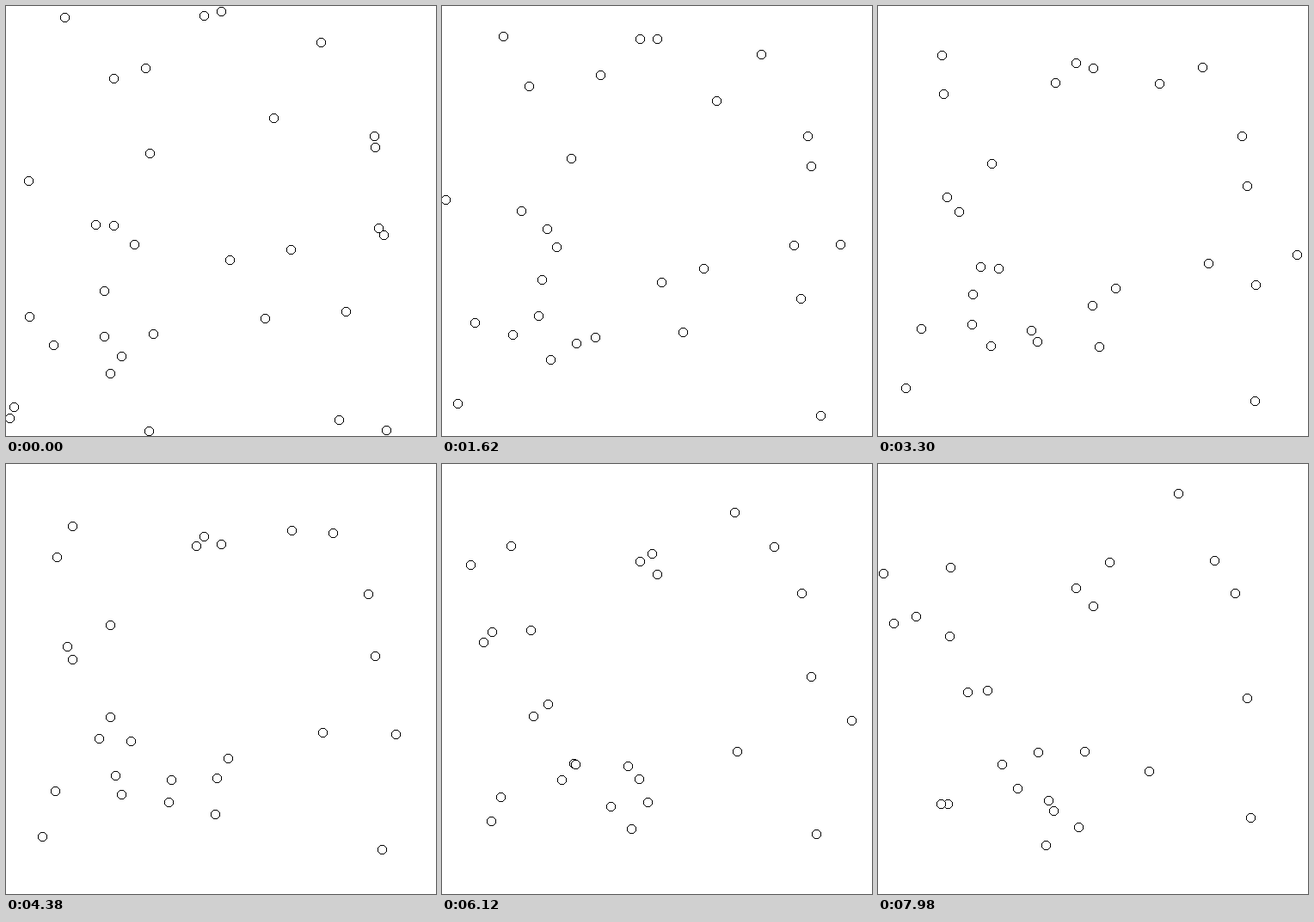
Write an HTML page with a canvas that moves like this. It is 500 px wide and 500 px high and loops after 8000 ms.

```html
<!DOCTYPE html>
<html lang="en">
<head>
<meta charset="utf-8">
<title>Drifting circles</title>
<style>
  html, body { margin: 0; width: 100%; height: 100%; overflow: hidden; background: #fff; }
  canvas { display: block; width: 500px; height: 500px; }
</style>
</head>
<body>
<canvas id="stage" width="500" height="500"></canvas>
<script>
const SIZE = 500, RADIUS = 5, LOOP = 8000, STEP = 60;
const LAST = Math.floor(LOOP / STEP);
const ctx = document.getElementById('stage').getContext('2d');

// Each circle drifts evenly between two key points, back to front:
// x and y at the first step, x and y at the last (may lie off stage).
const paths = [
  [67.8, 13.1, 83.9, 120.4],
  [230, 11, 230, 144],
  [250, 6, 250, 164.9],
  [366.1, 41.8, 391.4, 111.9],
  [162.2, 71.7, 269, 113.6],
  [124.8, 84.2, 5.6, 126.8],
  [311, 129.8, 349.2, 33.8],
  [428, 151, 415, 150.1],
  [429, 163.9, 429, 271.8],
  [167.2, 170.7, 83.1, 200],
  [26, 203, -84, 313],
  [104.3, 254, 44.4, 177],
  [148.6, 277.4, 17.6, 185],
  [125.1, 254.8, 162.1, 376.9],
  [433, 258.1, 315, 357.2],
  [439.2, 266, 555.2, 322],
  [387, 481, 348, 614],
  [9, 466, -84, 439],
  [166, 494, 166, 587],
  [441.6, 492.8, 432.8, 411],
  [260.1, 295.4, 232.8, 422.4],
  [331, 282.9, 198, 390.8],
  [395, 354.9, 501.1, 280.4],
  [113.6, 331.4, 126.5, 263],
  [27.3, 360.6, 81, 395.1],
  [4.1, 478.9, 72.6, 395.1],
  [301.2, 362.6, 195.1, 442.7],
  [113.9, 384, 103.9, 264.8],
  [170.9, 380.8, 204.2, 402.9],
  [55, 394.3, 186, 335.1],
  [134.2, 407, 240.3, 333.9],
  [121, 427.1, 144.1, 349]
];

const lerp = (a, b, t) => a + (b - a) * t;
const inside = v => v >= 0 && v <= SIZE;

// Hard-edged circle: whole pixels, sorted by rounded distance from the centre
const disc = new Path2D(), ring = new Path2D();
for (let dy = -RADIUS; dy <= RADIUS; dy++) {
  for (let dx = -RADIUS; dx <= RADIUS; dx++) {
    const distance = Math.round(Math.hypot(dx, dy));
    if (distance < RADIUS) disc.rect(dx, dy, 1, 1);
    if (distance === RADIUS) ring.rect(dx, dy, 1, 1);
  }
}

function fill(shape, color) {
  ctx.fillStyle = color;
  ctx.fill(shape);
}

function drawCircle(x, y) {
  ctx.setTransform(1, 0, 0, 1, Math.round(x), Math.round(y));
  fill(disc, '#fff');
  fill(ring, '#000');
}

function draw(time) {
  const t = Math.floor((time % LOOP) / STEP) / LAST;
  ctx.resetTransform();
  ctx.clearRect(0, 0, SIZE, SIZE);
  for (const [x0, y0, x1, y1] of paths) {
    const x = lerp(x0, x1, t), y = lerp(y0, y1, t);
    // A circle vanishes once its centre leaves the stage
    if (inside(x) && inside(y)) drawCircle(x, y);
  }
}

const start = performance.now();

function tick() {
  draw(performance.now() - start);
  requestAnimationFrame(tick);
}
tick();
</script>
</body>
</html>
```
